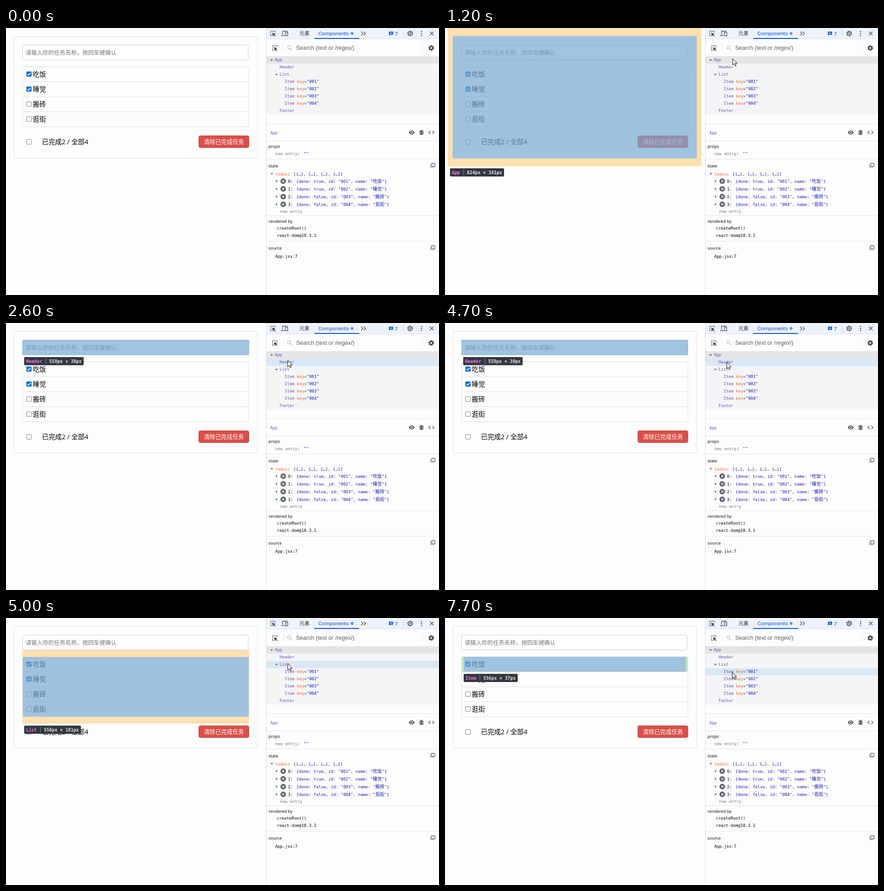
An HTML page that plays this animation: 952x588 px, repeating every 8 s.

```html
<!DOCTYPE html>
<html lang="zh-CN">
<head>
<meta charset="utf-8">
<title>Component inspector</title>
<style>
  html, body { margin: 0; width: 100%; height: 100%; overflow: hidden; background: #fdfdfd; }
  svg { display: block; }
  text { white-space: pre; }
  .page { font-family: "Open Sans", "Noto Sans CJK SC", "Noto Sans CJK", sans-serif; font-size: 14.5px; }
  .mono { font: 9px "DejaVu Sans Mono", "Noto Sans CJK SC", "Noto Sans CJK", monospace; }
  .tip { font: bold 9.85px "DejaVu Sans Mono", monospace; }
  .label { font: 9.4px "Open Sans", sans-serif; }
  .tab { font: 11.7px Roboto, "Noto Sans CJK SC", "Noto Sans CJK", sans-serif; }
  .search { font: 12.5px "Liberation Sans", Arial, sans-serif; }
</style>
</head>
<body>
<svg id="stage" width="952" height="588" viewBox="0 0 952 588"></svg>
<script>
const PURPLE = '#6a51b2', ORANGE = '#ef6632', NAVY = '#1a1aa6', GREY = '#777', ICON = '#474b52', BLUE = '#0b57d0';
const CONTENT = 'rgba(120,170,210,.7)', MARGIN = 'rgba(255,155,0,.3)', PADDING = 'rgba(77,200,0,.3)', BORDER = 'rgba(255,200,50,.3)';
const LOOP = 8000;

const text = (x, y, s, cls, fill = '#000', size) =>
  `<text x="${x}" y="${y}" class="${cls}" fill="${fill}"${size ? ` style="font-size:${size}px"` : ''}>${s}</text>`;
const rect = (x, y, w, h, fill, extra = '') =>
  `<rect x="${x}" y="${y}" width="${w}" height="${h}" fill="${fill}" ${extra}/>`;
const circle = (x, y, r, fill, extra = '') => `<circle cx="${x}" cy="${y}" r="${r}" fill="${fill}" ${extra}/>`;
const path = (d, fill = 'none', stroke = 'none', width = 1.3, extra = '') =>
  `<path d="${d}" fill="${fill}" stroke="${stroke}" stroke-width="${width}" ${extra}/>`;
const line = (d, width) => path(d, 'none', ICON, width);
const mono = (x, y, s, fill) => text(x, y, s, 'mono', fill);
const span = (s, fill) => `<tspan fill="${fill}">${s}</tspan>`;
const caretDown = (x, y) => path(`M${x - 3} ${y - 1.5}h6l-3 3.5z`, '#666');
const caretRight = (x, y) => path(`M${x - 1.5} ${y - 3}v6l3.5-3z`, '#666');

function checkbox(y, done) {
  return done
    ? rect(44.7, y - 5.8, 11.6, 11.6, '#0b70d6', 'rx="2"') + path(`M47 ${y}l2.5 2.6 4.7-5.2`, 'none', '#fff', 1.7)
    : rect(45.2, y - 5.3, 10.6, 10.6, '#fff', 'rx="2" stroke="#767676"');
}

const todos = [['吃饭', true], ['睡觉', true], ['搬砖', false], ['逛街', false]];

function todoPage() {
  const items = todos.map(([name, done], i) => {
    const y = 101.5 + i * 33;
    return (i ? path(`M37 ${y - 16}H534`, 'none', '#ddd', 1) : '') + checkbox(y, done) + text(59, y + 5.8, name, 'page');
  });
  return rect(17.5, 18.5, 535.5, 268, '#fdfdfd', 'rx="4" stroke="#ddd"') +
    rect(36.5, 37.5, 496, 33, '#fff', 'rx="3.5" stroke="#ccc"') +
    text(43, 58.5, '请输入你的任务名称，按回车键确认', 'page', '#757575', 12.5) +
    rect(36.5, 85.5, 497.5, 132, 'none', 'rx="2" stroke="#ddd"') + items.join('') +
    checkbox(250.8, false) + text(79, 256, '已完成2 / 全部4', 'page') +
    rect(424, 237.3, 110, 26, '#da4f49', 'rx="3.5" stroke="#bd362f"') +
    text(435, 255.2, '清除已完成任务', 'page', '#fff', 12.6);
}

function picker(x, y) {
  return path(`M${x - 5} ${y + 5}V${y - 5}H${x + 5}V${y - 1}M${x - 5} ${y + 5}H${x - 1}`, 'none', ICON, 1.3, 'stroke-dasharray="2 1"') +
    path(`M${x - 2} ${y - 2}l8 3-3.2 1.5 3 3-1.3 1.3-3-3-1.4 3z`, ICON);
}

const gear = (x, y, hole) =>
  circle(x, y, 5.2, 'none', `stroke="${ICON}" stroke-width="2" stroke-dasharray="2.72"`) +
  circle(x, y, hole ? 4.6 : 3.5, 'none', `stroke="${ICON}" stroke-width="${hole ? 1.5 : 3}"`) +
  (hole ? circle(x, y, 1.8, 'none', `stroke="${ICON}" stroke-width="1.2"`) : '');

const copyIcon = (x, y) => rect(x - 2, y - 4.5, 7, 7, 'none', `stroke="${ICON}" stroke-width="1.2"`) +
  path(`M${x - 4.5} ${y - 3}v7.5h8`, 'none', ICON, 1.2, 'stroke-dasharray="1.4 1"');

function toolbar() {
  return rect(573, 0, 379, 24, '#edf2fb') + path('M573 24H952', 'none', '#d3e3fd', 1) +
    picker(587, 12) +
    line('M608 14V7h11M605 16.5h8') + rect(614.5, 9.5, 5, 7.5, 'none', `stroke="${ICON}" stroke-width="1.3"`) +
    text(645, 16, '元素', 'tab', '#333', 11.2) +
    text(687, 16, 'Components', 'tab', BLUE) + circle(761, 12, 3.2, '#5f94e6') +
    rect(678, 22, 98, 2, BLUE) +
    line('M781 8l4 4-4 4M786.5 8l4 4-4 4') +
    path('M842 8h9v7h-7l-2 2z', BLUE) + path('M844 10.5h5M844 12.7h5', 'none', '#fff', .9) +
    text(855, 16.5, '7', 'tab', BLUE) + path('M873.5 5v14', 'none', '#c9d8f0', 1) +
    gear(888.5, 12, true) +
    [7.5, 12, 16.5].map(y => circle(913.5, y, 1.3, ICON)).join('') +
    line('M932 8l8 8M940 8l-8 8', 1.4);
}

function searchBar() {
  return picker(591, 44) + path('M609.5 36v16M916.5 36v16', 'none', '#e8e8e8', 1) +
    circle(622.5, 42.5, 3.3, 'none', 'stroke="#bbb" stroke-width="1.2"') + path('M625 45l4 4', 'none', '#bbb', 1.3) +
    text(638, 48.3, 'Search (text or /regex/)', 'search', '#5c5c5c') + gear(935, 44, false);
}

const treeRows = [['App', 591], ['Header', 601.5], ['List', 601.5],
  ...todos.map((_, i) => ['Item', 612.5, `00${i + 1}`]), ['Footer', 601.5]];

const tree = () => treeRows.map(([name, x, key], i) => {
  const attr = key ? ' ' + span('key', ORANGE) + span('=', '#555') + span(`"${key}"`, NAVY) : '';
  return mono(x, 73.3 + i * 16, name + attr, PURPLE);
}).join('') + caretDown(584, 70.5) + caretDown(594.5, 102.5);

function details() {
  const entries = todos.map(([name, done], i) => {
    const y = 337.3 + i * 17;
    return caretRight(595, y) + circle(609.5, y, 6, '#555b65') +
      path(`M607 ${y - 2.5}l5 5M612 ${y - 2.5}l-5 5`, 'none', '#fff', 1.3) +
      mono(620, y + 3.2, `${i}:`) +
      mono(638.5, y + 3.2, `{done: ${done}, id: "00${i + 1}", name: "<tspan font-size="10">${name}</tspan>"}`, NAVY);
  }).join('');
  return path('M573 210.5H952M573 248.5H952M573 288.5H952M573 413.5H952M573 469.5H952', 'none', '#e1e5ec', 1) +
    mono(581, 234, 'App', PURPLE) +
    path('M885.5 230Q892 221 898.5 230Q892 239 885.5 230z', ICON) +
    circle(892, 230, 2.4, ICON, 'stroke="#fff" stroke-width="1.2"') +
    rect(910.5, 226, 6, 9.5, ICON, 'rx="3"') + line('M908.5 227.5h10M908 230.5h11M908.5 233.5h10M911 224.5l2 2M916 224.5l-2 2', 1.2) +
    path('M911.5 229.5h4M911.5 232h4', 'none', '#fff', .8) +
    line('M933 226.5l-3.5 3.5 3.5 3.5M937.5 226.5l3.5 3.5-3.5 3.5') +
    text(577, 263.5, 'props', 'label') + mono(592, 279.5, 'new entry', GREY) + mono(641, 279.5, ':') + mono(654.5, 279.5, '""', NAVY) +
    text(577, 306.5, 'state', 'label') + copyIcon(938, 302.5) +
    caretDown(584.5, 321) + mono(592, 324.5, 'todos' + span(':', '#000'), ORANGE) +
    mono(632, 324.5, `[${Array(4).fill('{…}').join(', ')}]`, NAVY) +
    entries + mono(602.5, 406.7, 'new entry', GREY) +
    text(577, 429, 'rendered by', 'label') + mono(595.5, 444, 'createRoot()') + mono(595.5, 460, 'react-dom@18.3.1') +
    text(577, 487.7, 'source', 'label') + copyIcon(938, 484) + mono(592, 506, 'App.jsx:7');
}

function tooltip(x, y, name, size) {
  const advance = 5.93, nameEnd = x + 4.5 + name.length * advance;
  const width = nameEnd - x + 19.5 + size.length * advance;
  return rect(x, y, width, 18, '#333740', 'rx="2"') + text(x + 4, y + 12.7, name, 'tip', '#ee78e6') +
    rect(nameEnd + 7, y + 3, 1, 12, '#8e9196') + text(nameEnd + 15, y + 12.7, size, 'tip', '#e2e2e2');
}

const frame = (x, y, w, h, ix, iy, iw, ih, fill) =>
  path(`M${x} ${y}h${w}v${h}h${-w}zM${ix} ${iy}h${iw}v${ih}h${-iw}z`, fill, 'none', 0, 'fill-rule="evenodd"');

// Box-model highlights, in the order of the tree rows
const overlays = [
  frame(6, 0, 558, 304.5, 17, 18, 536.5, 269, MARGIN) + rect(17, 18, 536.5, 269, CONTENT) +
    tooltip(11, 309, 'App', '624px × 341px'),
  rect(36, 37, 498.5, 33.5, CONTENT) + tooltip(40, 75, 'Header', '558px × 38px'),
  frame(36, 70.5, 498.5, 162, 36, 85, 498.5, 133, MARGIN) + frame(36, 85, 498.5, 133, 37, 86, 496.7, 131.2, BORDER) +
    rect(37, 86, 496.7, 131.2, CONTENT) + tooltip(40, 237, 'List', '558px × 181px'),
  rect(36.7, 85.5, 4.3, 32.5, PADDING) + rect(529.5, 85.5, 4.3, 32.5, PADDING) + rect(41, 85.5, 488.5, 32.5, CONTENT) +
    rect(36.7, 118, 497, 1, BORDER) + tooltip(41, 123, 'Item', '556px × 37px')
];

// Pointer samples: time, x, y. The row under the pointer is the highlighted one.
const pointer = [
  [800, 753, 20], [900, 705, 38], [1000, 668, 50], [1100, 643, 59], [1200, 632, 67], [1300, 630, 69],
  [2500, 623, 76], [2600, 619, 82], [4700, 619, 86], [4800, 619, 89], [4900, 619, 93], [5000, 619, 100],
  [7600, 629, 116], [7700, 631, 119]
];

const stage = document.getElementById('stage');
stage.innerHTML = rect(0, 0, 952, 588, '#fdfdfd') + todoPage() +
  rect(572, 0, 380, 588, '#fdfdfd') + toolbar() + searchBar() +
  rect(573, 62, 379, 129, '#f4f5f6') + rect(573, 62, 379, 16.5, '#e5e5e5') +
  `<g id="hover">${rect(573, 62.5, 379, 16, '#d9e8f3')}</g>` + tree() + details() +
  path('M572.5 0V588', 'none', '#d0def2', 1) +
  overlays.map(o => `<g class="overlay">${o}</g>`).join('') +
  `<g id="cursor">${path('M.5 .5v14l3.2-3 2.3 5.3 2.2-1-2.3-5.1h4.3z', '#fff', '#000', 1)}</g>`;

const hover = document.getElementById('hover'), cursor = document.getElementById('cursor');
const overlayNodes = [...stage.querySelectorAll('.overlay')];
const show = (node, on) => node.setAttribute('visibility', on ? 'visible' : 'hidden');

function draw(now) {
  const t = now % LOOP;
  const sample = pointer.filter(p => p[0] <= t).pop();
  const row = sample ? Math.floor((sample[2] - 62.5) / 16) : -1;
  show(cursor, sample);
  if (sample) cursor.setAttribute('transform', `translate(${sample[1]} ${sample[2]})`);
  show(hover, row > 0);
  hover.setAttribute('transform', `translate(0 ${row * 16})`);
  overlayNodes.forEach((node, i) => show(node, i === row));
}

function tick() {
  draw(performance.now());
  requestAnimationFrame(tick);
}
tick();
</script>
</body>
</html>
```
